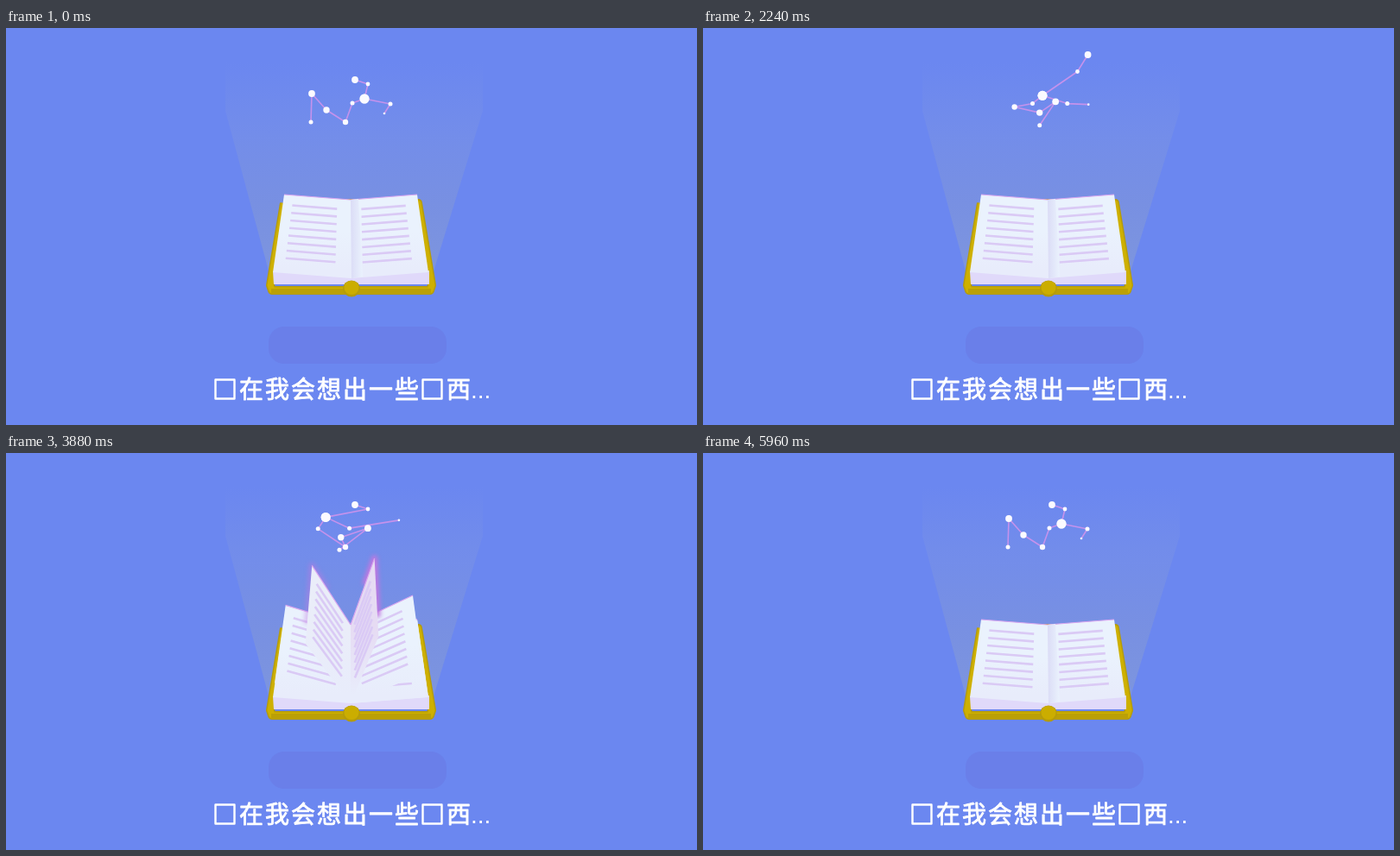
Recreate the animation shown at these times as an HTML page with a canvas. Size 800 px wide and 460 px high, loop 6000 ms.

```html
<!DOCTYPE html>
<html lang="zh">
<head>
<meta charset="utf-8">
<style>
html, body { margin: 0; width: 100%; height: 100%; overflow: hidden; background: #6b87f0; }
canvas { display: block; }
</style>
</head>
<body>
<canvas id="stage" width="800" height="460"></canvas>
<script>
const ctx = document.getElementById('stage').getContext('2d');
const LOOP = 6000, FLIP = 480;

// Each star drifts from home to a far point and back, in one of these rhythms
const early = { peak: 2050, end: 3800 }, brisk = { peak: 2840, end: 3700 },
  middle = { peak: 2840, end: 5100 }, slow = { peak: 2840, end: 6000 },
  late = { peak: 3480, end: 5100 };
const star = (home, far, rhythm, r) => ({ home, far, rhythm, r });
const a = star([404, 60], [447, 30], early, 3.9);
const b = star([419, 65], [434, 50], early, 2.4);
const c = star([415, 82], [362, 73], late, 5.5);
const d = star([445, 88], [389, 87], late, 2.5);
const e = star([438, 99], [458, 74], late, 1.3);
const f = star([401, 87], [354, 88], late, 2.5);
const g = star([393, 109], [341, 81], brisk, 3.2);
const h = star([371, 95], [401, 100], middle, 3.7);
const i = star([354, 76], [441, 91], slow, 3.9);
const j = star([353, 109], [412, 115], middle, 2.5);
const chains = [[a, b, c, d, e], [c, f, g, h, i, j]];

// Start times of page turns whose gaps grow steadily
const run = (count, start, gap, growth) =>
  Array.from({ length: count }, (_, n) => start + gap * n + growth * n * (n - 1) / 2);
const flips = [...run(3, 366, 927, 337), ...run(8, 3089, 98, 0), ...run(6, 3872, 61, 54)];

const smooth = s => s * s * (3 - 2 * s);

function trace(points) {
  ctx.beginPath();
  points.forEach(p => ctx.lineTo(...p));
}

function poly(points, fill) {
  trace(points);
  ctx.closePath();
  ctx.fillStyle = fill;
  ctx.fill();
}

function line(points, color, width) {
  trace(points);
  ctx.strokeStyle = color;
  ctx.lineWidth = width;
  ctx.stroke();
}

function oval(x, y, rx, ry, fill) {
  ctx.beginPath();
  ctx.ellipse(x, y, rx, ry, 0, 0, 2 * Math.PI);
  ctx.fillStyle = fill;
  ctx.fill();
}

function gradient(x0, y0, x1, y1, ...colors) {
  const fill = ctx.createLinearGradient(x0, y0, x1, y1);
  colors.forEach((color, n) => fill.addColorStop(n / (colors.length - 1), color));
  return fill;
}

// Point on a page: u from spine to edge, v from top to bottom, angle 0 = left, PI = right
function pagePoint(u, v, angle) {
  const cos = Math.cos(angle), reach = 77 + 13 * v;
  return [399 - u * reach * cos,
    199 + 91 * v - u * (80 * Math.sin(angle) + (6 + v) * Math.abs(cos))];
}

function drawPage(angle) {
  const at = (u, v) => pagePoint(u, v, angle);
  const lift = Math.sin(angle) ** 6, edgeOn = Math.sin(angle) ** 30;
  const tint = (flat, raised, upright) =>
    flat + (raised - flat) * lift + (upright - raised) * edgeOn;
  const color = `rgb(${tint(234, 236, 192)},${tint(242, 224, 140)},${tint(253, 240, 226)})`;

  // Purple motion glow around a fast page
  if (lift > 0.1) {
    ctx.save();
    ctx.filter = 'blur(2.5px)';
    ctx.globalAlpha = Math.min(1, 1.5 * lift);
    line([at(0.6, 0), at(1, 0), at(1, 0.75)], '#c277e0', 7);
    ctx.restore();
  }

  const top = Math.min(at(1, 0)[1], 199);
  poly([at(0, 0), at(1, 0), at(1, 1), at(0, 1)], gradient(0, top, 0, 280, color, color, '#e8ecfb'));
  line([at(0, 0), at(1, 0)], '#d9a6f0', 1.2);
  const [inner, outer] = Math.cos(angle) > 0 ? [0.2, 0.86] : [0.157, 0.81];
  for (let n = 0; n < 8; n++) {
    const v = 0.13 + 0.097 * n;
    line([at(inner, v), at(outer, v)], '#dacaf5', 2.6);
  }
}

function drawBook(t) {
  // Cover
  ctx.lineJoin = 'round';
  const cover = [[322, 203], [477, 203], [493, 298], [491, 304], [308, 304], [306, 298], [322, 203]];
  line(cover, '#b59c0a', 10);
  line(cover, '#ceb000', 7);
  line([[307, 305], [492, 305]], '#bba006', 6);

  // Page block
  poly([[309, 282], [399, 288], [490, 281], [490, 297], [310, 297]], '#e0d9fa');
  drawPage(0);
  drawPage(Math.PI);
  poly([[399, 199], [408, 198], [413, 288], [400, 290]],
    gradient(399, 0, 413, 0, '#dbdcf6', '#eaf2fd'));

  // Turning pages, the steepest in front
  flips
    .map(start => (t - start) / FLIP)
    .filter(s => s > 0 && s < 1)
    .map(s => Math.PI * (1 + Math.cos(Math.PI * s)) / 2)
    .sort((p, q) => Math.sin(p) - Math.sin(q))
    .forEach(drawPage);

  // Spine knob
  oval(400, 302, 10, 9.5, '#b59c0a');
  oval(400, 301, 8.5, 8, '#cbad00');
}

function starPoint({ home, far, rhythm: { peak, end } }, t) {
  const away = t < peak ? (t / peak) ** 2 : 1 - smooth(Math.min(1, (t - peak) / (end - peak)));
  return home.map((value, axis) => value + (far[axis] - value) * away);
}

function drawStars(t) {
  chains.forEach(chain => line(chain.map(s => starPoint(s, t)), '#c592ec', 1.6));
  chains.flat().forEach(s => oval(...starPoint(s, t), s.r, s.r, '#fbfaff'));
}

function drawCaption() {
  ctx.fillStyle = ctx.strokeStyle = '#fff';
  ctx.font = '28px "Noto Sans CJK SC", "Noto Sans CJK", sans-serif';
  [...'□在我会想出一些□西'].forEach((ch, n) => {
    const x = 240 + 30 * n, missing = ch === '□';
    ctx.lineWidth = missing ? 2.4 : 0.8;
    if (missing) return ctx.strokeRect(x + 2.5, 407.5, 22, 22);
    ctx.fillText(ch, x, 429);
    ctx.strokeText(ch, x, 429);
  });
  ctx.font = '28px "Liberation Sans", sans-serif';
  ctx.fillText('...', 538, 429);
}

function draw() {
  const t = performance.now() % LOOP;
  ctx.fillStyle = '#6b87f0';
  ctx.fillRect(0, 0, 800, 460);
  // Light beam and shadow
  poly([[254, 40], [552, 40], [552, 96], [494, 285], [305, 285], [254, 96]],
    gradient(0, 40, 0, 285, '#6b87f0', '#738dea', '#7890e2', '#7d95de'));
  ctx.beginPath();
  ctx.roundRect(304, 346, 206, 43, 18);
  ctx.fillStyle = '#6a7fe9';
  ctx.fill();
  drawBook(t);
  drawStars(t);
  drawCaption();
  requestAnimationFrame(draw);
}
draw();
</script>
</body>
</html>
```
